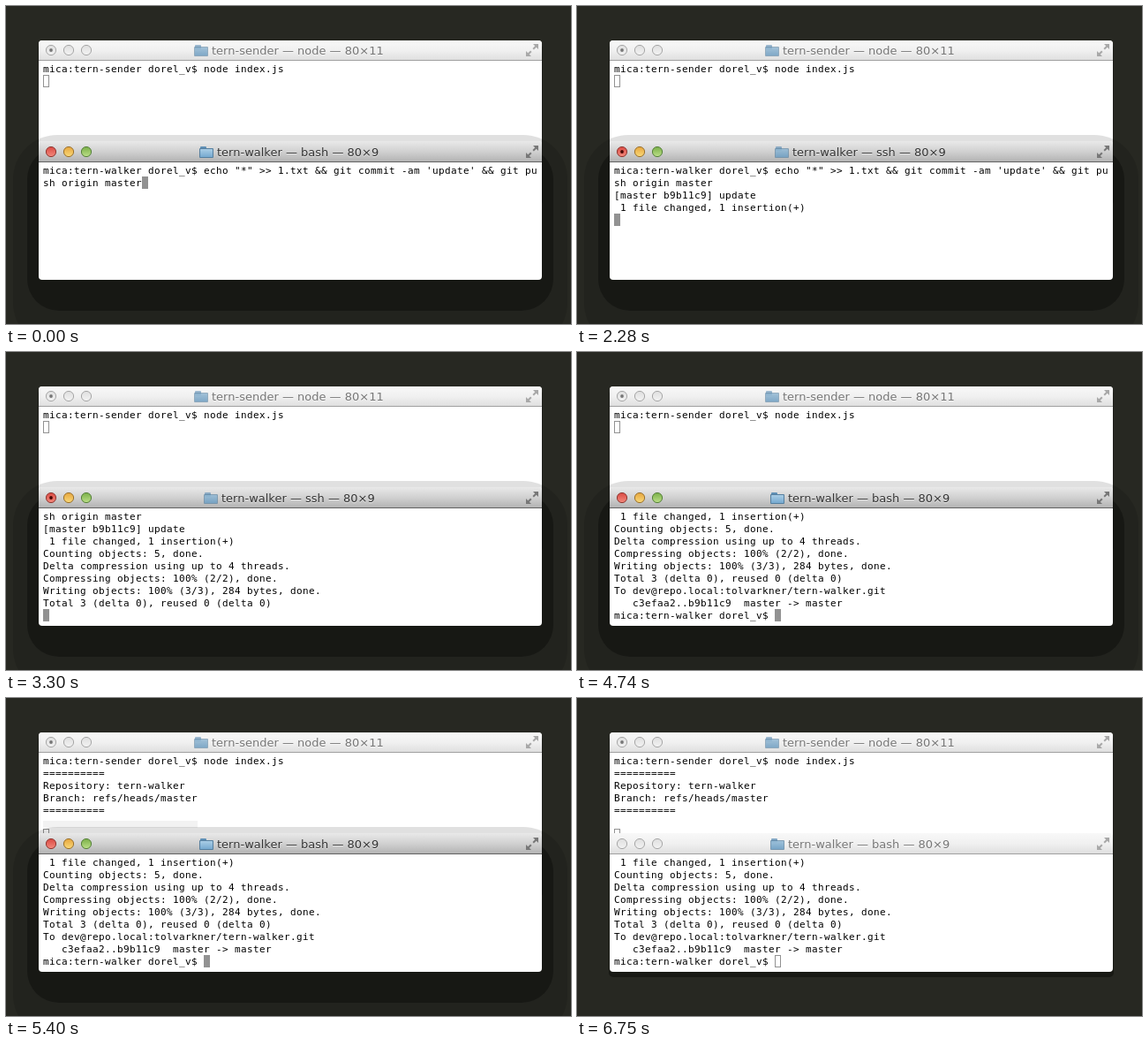
Write an HTML page with a canvas that moves like this. It is 640 by 360 pixels and loops after 6820 ms.

```html
<!DOCTYPE html>
<html lang="en">
<head>
<meta charset="utf-8">
<title>Two terminals</title>
<style>
  html, body { margin: 0; width: 100%; height: 100%; overflow: hidden; background: #272822; }
  canvas { display: block; width: 640px; height: 360px; }
</style>
</head>
<body>
<canvas id="stage" width="640" height="360"></canvas>
<script>
const ctx = document.getElementById('stage').getContext('2d');

const LOOP = 6820;
const COMMIT = 750, PUSH = 3300, DONE = 3750, HOOK = 5400, BLUR = 6750;
const LEFT = 37, WIDTH = 570, CELL = 7, ROW = 14, TEXT_X = 42;
const MONO = '11px "DejaVu Sans Mono", monospace';
const SANS = '13px "DejaVu Sans", sans-serif';

const serverPrompt = 'mica:tern-sender dorel_v$ ';
const clientPrompt = 'mica:tern-walker dorel_v$ ';

const serverLog = [
  serverPrompt + 'node index.js',
  '==========',
  'Repository: tern-walker',
  'Branch: refs/heads/master',
  '==========',
  ''
];

const clientLog = [
  clientPrompt + 'echo "*" >> 1.txt && git commit -am \'update\' && git pu',
  'sh origin master',
  '[master b9b11c9] update',
  ' 1 file changed, 1 insertion(+)',
  'Counting objects: 5, done.',
  'Delta compression using up to 4 threads.',
  'Compressing objects: 100% (2/2), done.',
  'Writing objects: 100% (3/3), 284 bytes, done.',
  'Total 3 (delta 0), reused 0 (delta 0)',
  'To dev@repo.local:tolvarkner/tern-walker.git',
  '   c3efaa2..b9b11c9  master -> master',
  clientPrompt
];

function box(x, y, w, h, r, fill) {
  ctx.beginPath();
  ctx.roundRect(x, y, w, h, r);
  ctx.fillStyle = fill;
  ctx.fill();
}

function gradient(y, h, ...colors) {
  const g = ctx.createLinearGradient(0, y, 0, y + h);
  colors.forEach((c, i) => g.addColorStop(i / (colors.length - 1), c));
  return g;
}

function button(x, y, top, bottom, rim, dot) {
  ctx.beginPath();
  ctx.arc(x, y, 5.6, 0, Math.PI * 2);
  ctx.fillStyle = gradient(y - 6, 12, top, bottom);
  ctx.fill();
  ctx.strokeStyle = rim;
  ctx.lineWidth = 1;
  ctx.stroke();
  if (dot) {
    ctx.beginPath();
    ctx.arc(x, y, 1.9, 0, Math.PI * 2);
    ctx.fillStyle = dot;
    ctx.fill();
  }
}

function buttons(y, active, busy) {
  if (active) {
    button(51, y, '#d8463f', '#f58d80', '#8e3731', busy && '#4a0806');
    button(71, y, '#e5a33a', '#fbdc7c', '#99702c');
    button(91, y, '#77ad45', '#c0e38c', '#55803a');
  } else {
    for (let i = 0; i < 3; i++) {
      button(51 + i * 20, y, '#dedede', '#f4f4f4', '#a6a6a6', busy && i === 0 && '#777');
    }
  }
}

function folder(x, y, alpha) {
  ctx.globalAlpha = alpha;
  box(x + 1, y, 7, 5, 1, '#5f8fb5');
  box(x, y + 2, 16, 11, 1, '#557f9f');
  box(x + 1, y + 3, 14, 9, 0.5, gradient(y + 3, 9, '#a9cde6', '#76a9cf'));
  ctx.globalAlpha = 1;
}

// Pair of diagonal arrows pointing away from the centre
function zoomIcon(cx, cy, color) {
  ctx.fillStyle = ctx.strokeStyle = color;
  ctx.lineWidth = 2;
  for (const s of [1, -1]) {
    ctx.beginPath();
    ctx.moveTo(cx + 7 * s, cy - 7 * s);
    ctx.lineTo(cx + 7 * s, cy - s);
    ctx.lineTo(cx + s, cy - 7 * s);
    ctx.fill();
    ctx.beginPath();
    ctx.moveTo(cx + 1.2 * s, cy - 1.2 * s);
    ctx.lineTo(cx + 5 * s, cy - 5 * s);
    ctx.stroke();
  }
}

function titleBar(y, h, title, iconX, iconAlpha, active, busy) {
  const fill = active
    ? gradient(y, h, '#e9e9e9', '#d0d0d0', '#b1b1b1')
    : gradient(y, h, '#f8f8f8', '#f0f0f0', '#dedede');
  box(LEFT, y, WIDTH, h, [4, 4, 0, 0], fill);
  ctx.fillStyle = active ? '#626262' : '#a0a0a0';
  ctx.fillRect(LEFT, y + h - 1, WIDTH, 1);

  const mid = y + (active || y > 100 ? 12 : 11);
  buttons(mid, active, busy);
  folder(iconX, mid - 6, iconAlpha);
  zoomIcon(596, mid, active ? '#777' : '#a8a8a8');

  ctx.font = SANS;
  ctx.fillStyle = 'rgba(255,255,255,.6)';
  ctx.fillText(title, iconX + 20, mid + 6);
  ctx.fillStyle = active ? '#353535' : '#777';
  ctx.fillText(title, iconX + 20, mid + 5);
}

function lines(list, top) {
  ctx.font = MONO;
  ctx.fillStyle = '#000';
  list.forEach((line, row) => {
    [...line].forEach((ch, col) => {
      if (ch !== ' ') ctx.fillText(ch, TEXT_X + col * CELL, top + row * ROW + 11);
    });
  });
}

function cursor(col, row, top, solid) {
  const x = TEXT_X + col * CELL, y = top + row * ROW;
  if (solid) {
    ctx.fillStyle = '#929292';
    ctx.fillRect(x, y, CELL, ROW);
  } else {
    ctx.strokeStyle = '#929292';
    ctx.lineWidth = 1;
    ctx.strokeRect(x + 0.5, y + 0.5, CELL - 1, ROW - 1);
  }
}

function serverWindow(t) {
  const log = t < HOOK ? serverLog.slice(0, 1) : serverLog;
  box(LEFT - 1, 43, WIDTH + 2, 183, 5, '#1d1e19');
  box(LEFT, 39, WIDTH, 181, 4, '#fff');
  titleBar(39, 23, 'tern-sender — node — 80×11', 213, 0.6, false, true);
  if (t >= HOOK && t < BLUR) {
    ctx.fillStyle = '#f2f2f2';
    ctx.fillRect(TEXT_X, 139, 175, 8);
  }
  lines(log, 64);
  cursor(0, log.length, 64, false);
}

function clientWindow(t) {
  const active = t < BLUR;
  const busy = t >= COMMIT && t < DONE;
  const count = t < COMMIT ? 2 : t < PUSH ? 4 : t < DONE ? 9 : 12;
  const log = clientLog.slice(0, count);
  if (busy) log.push('');
  const view = log.slice(-9);

  if (active) {
    box(8, 146, 628, 240, 50, 'rgba(0,0,0,.12)');
    box(24, 160, 596, 185, 36, 'rgba(0,0,0,.32)');
  } else {
    box(LEFT - 1, 157, WIDTH + 2, 159, 5, '#181914');
  }
  box(LEFT, 153, WIDTH, 157, 4, '#fff');
  titleBar(153, 24, `tern-walker — ${busy ? 'ssh' : 'bash'} — 80×9`,
    busy ? 224 : 219, busy ? 0.65 : active ? 1 : 0.75, active, busy);
  lines(view, 179);
  cursor(view[view.length - 1].length, view.length - 1, 179, active);
}

function draw() {
  const t = performance.now() % LOOP;
  ctx.fillStyle = '#272822';
  ctx.fillRect(0, 0, 640, 360);
  serverWindow(t);
  clientWindow(t);
  requestAnimationFrame(draw);
}
draw();
</script>
</body>
</html>
```
